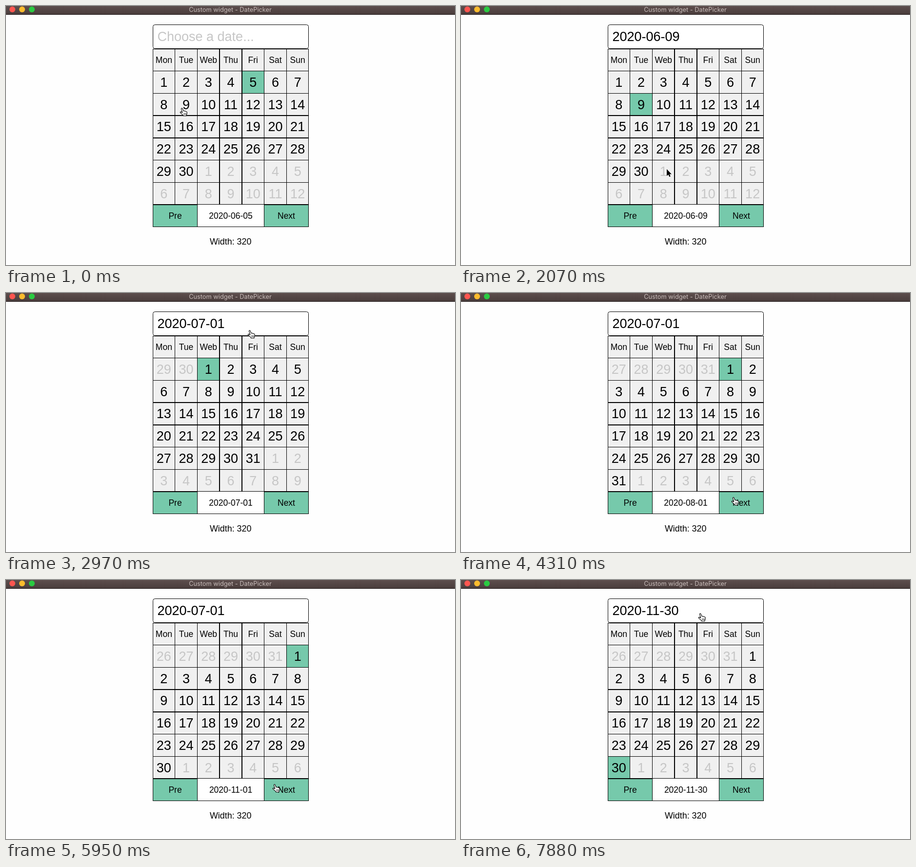
Recreate the animation shown at these times as an HTML page. Size 921 by 532 pixels, loop 8000 ms.

```html
<!DOCTYPE html>
<html lang="en">
<head>
<meta charset="utf-8">
<title>Custom widget - DatePicker</title>
<style>
html, body { margin: 0; width: 100%; height: 100%; overflow: hidden; background: #fefefe; }
svg { display: block; width: 921px; height: 532px; }
text { font-family: "Liberation Sans", Arial, sans-serif; font-size: 17.5px; fill: #000; }
.mid { text-anchor: middle; }
.big { font-size: 27px; }
.dim { fill: #c6c6c6; }
.title { font: 12.8px Inter, sans-serif; fill: #c9bdbb; }
.width { font-size: 17.9px; }
.crisp { shape-rendering: crispEdges; }
</style>
</head>
<body>
<svg viewBox="0 0 921 532">
  <defs>
    <linearGradient id="bar" x2="0" y2="1">
      <stop stop-color="#5d4e4d"/><stop offset="1" stop-color="#4a3d3c"/>
    </linearGradient>
  </defs>
  <rect width="921" height="532" fill="#fefefe"/>
  <rect width="921" height="17" fill="url(#bar)"/>
  <rect y="17" width="921" height="1" fill="#171010"/>
  <circle cx="13" cy="7" r="6" fill="#fe5650"/>
  <circle cx="33" cy="7" r="6" fill="#fdbc2e"/>
  <circle cx="53" cy="7" r="6" fill="#2acb42"/>
  <text class="mid title" x="460" y="12">Custom widget - DatePicker</text>
  <rect x="301.5" y="38.5" width="319" height="49" rx="4" fill="#fff" stroke="#000"/>
  <g id="picker"></g>
  <g id="hand" fill="#fff" stroke="#000" stroke-linejoin="round" stroke-linecap="round">
    <path d="M-1.6 1.2Q-1.2-.8.6 0L3.2 5.8Q5 4.6 6 6.3Q7.6 5.4 8.5 7Q10 6.6 10.3 8.6L10 12L9 14V15.8H2.6L2.4 14.4L-3 9.6Q-4.6 7.8-2.6 7.4Q-1.2 7.6.8 9Z" stroke-width="1.1"/>
    <path d="M4 10.3v3M6 10.3v3M8 10.3v3" stroke-width=".8"/>
  </g>
  <path id="arrow" d="M0 0V14.2L3.2 11.2L5.4 16L7.8 15L5.7 10.4H10Z" stroke="#fff" stroke-width="1.2" paint-order="stroke"/>
</svg>
<script>
const LOOP = 8000, LEFT = 301, TOP = 88, CELL = 320 / 7;
const TEAL = '#76c9ab', GREY = '#f0f0f0';
const DAYS = ['Mon', 'Tue', 'Web', 'Thu', 'Fri', 'Sat', 'Sun'];

// time, open, field text, selected date
const VIEWS = [
  [0, true, '', '2020-06-05'],
  [140, false, '2020-06-09', '2020-06-09'],
  [880, true, '2020-06-09', '2020-06-09'],
  [2220, false, '2020-07-01', '2020-07-01'],
  [2970, true, '2020-07-01', '2020-07-01'],
  [4310, true, '2020-07-01', '2020-08-01'],
  [4760, true, '2020-07-01', '2020-09-01'],
  [5210, true, '2020-07-01', '2020-10-01'],
  [5510, true, '2020-07-01', '2020-11-01'],
  [6840, false, '2020-11-30', '2020-11-30'],
  [7880, true, '2020-11-30', '2020-11-30']
];

// time, pointer tip x, y
const POINTER = [
  [0, 361, 210], [290, 364, 202], [440, 380, 158], [590, 399, 104], [740, 409, 79],
  [1180, 416, 100], [1330, 440, 170], [1480, 446, 270], [1630, 428, 337], [2070, 422, 335],
  [2370, 436, 276], [2520, 478, 140], [2670, 500, 77],
  [3120, 503, 92], [3270, 515, 170], [3420, 535, 280], [3560, 550, 370], [3710, 557, 412], [3860, 559, 420],
  [5950, 551, 420], [6100, 500, 412], [6250, 420, 398], [6400, 352, 386], [6550, 336, 382],
  [6990, 342, 360], [7140, 385, 250], [7280, 440, 140], [7430, 482, 82], [7580, 491, 69]
];

const byId = id => document.getElementById(id);
const stepAt = (steps, t) => steps.findLast(step => step[0] <= t);
const text = (x, y, str, cls = 'mid') => `<text x="${x}" y="${y}" class="${cls}">${str}</text>`;
const rect = (x, y, w, h, fill = '#000') =>
  `<rect class="crisp" x="${x}" y="${y}" width="${w}" height="${h}" fill="${fill}"/>`;
const centre = col => LEFT + CELL * (col + .5);

function monthCells(date) {
  const [year, month, day] = date.split('-').map(Number);
  const offset = (new Date(Date.UTC(year, month - 1, 1)).getUTCDay() + 6) % 7;
  return Array.from({ length: 42 }, (_, i) => {
    const d = new Date(Date.UTC(year, month - 1, 1 + i - offset));
    const current = d.getUTCMonth() === month - 1;
    return { label: d.getUTCDate(), current, selected: current && d.getUTCDate() === day };
  });
}

function gridLines() {
  let out = '';
  for (let i = 0; i <= 7; i++) {
    const x = i === 7 ? 620 : Math.floor(LEFT + CELL * i);
    const y = Math.floor(TOP + CELL * i);
    const double = i === 3 || i === 4;
    out += rect(double ? Math.round(LEFT + CELL * i) - 1 : x, TOP, double ? 2 : 1, 320);
    out += rect(LEFT, double ? Math.round(TOP + CELL * i) - 1 : i === 7 ? 407 : y, 320, double ? 2 : 1);
  }
  return out;
}

function footer(date) {
  const button = (x, w, label) =>
    rect(x, 408, w, 46) + rect(x + 1, 409, w - 2, 44, TEAL) + text(x + w / 2, 437, label);
  return rect(392, 408, 138, 45, '#fff') + rect(392, 453, 138, 1) +
    button(301, 92, 'Pre') + button(529, 92, 'Next') + text(461, 437, date);
}

function calendar(date) {
  let fills = rect(LEFT, TOP, 320, 320, GREY), labels = '';
  DAYS.forEach((name, col) => labels += text(centre(col), 117, name));
  monthCells(date).forEach((cell, i) => {
    const col = i % 7, row = Math.floor(i / 7);
    if (cell.selected) fills += rect(LEFT + CELL * col, TOP + CELL * (row + 1), CELL, CELL, TEAL);
    labels += text(centre(col), 166 + CELL * row, cell.label, cell.current ? 'mid big' : 'mid big dim');
  });
  return fills + gridLines() + labels + footer(date);
}

function clickable(x, y, open, date) {
  if (x < LEFT || x > 621 || y < 38) return false;
  if (y < TOP) return true;
  if (!open || y > 454) return false;
  if (y >= 408) return x < 393 || x > 529;
  const row = Math.floor((y - TOP) / CELL) - 1, col = Math.floor((x - LEFT) / CELL);
  return row >= 0 && monthCells(date)[row * 7 + col].current;
}

let shown;
function render(t) {
  const view = stepAt(VIEWS, t), [, open, field, date] = view;
  if (view !== shown) {
    shown = view;
    byId('picker').innerHTML =
      text(310.5, 72, field || 'Choose a date...', field ? 'big' : 'big dim') +
      (open ? calendar(date) : '') +
      text(460.7, open ? 490 : 124, 'Width: 320', 'mid width');
  }
  const [, x, y] = stepAt(POINTER, t);
  const isHand = clickable(x, y, open, date);
  for (const [id, on] of [['hand', isHand], ['arrow', !isHand]]) {
    byId(id).setAttribute('transform', `translate(${x} ${y})`);
    byId(id).style.display = on ? '' : 'none';
  }
}

const start = performance.now();
function tick() {
  render((performance.now() - start) % LOOP);
  requestAnimationFrame(tick);
}
tick();
</script>
</body>
</html>
```
